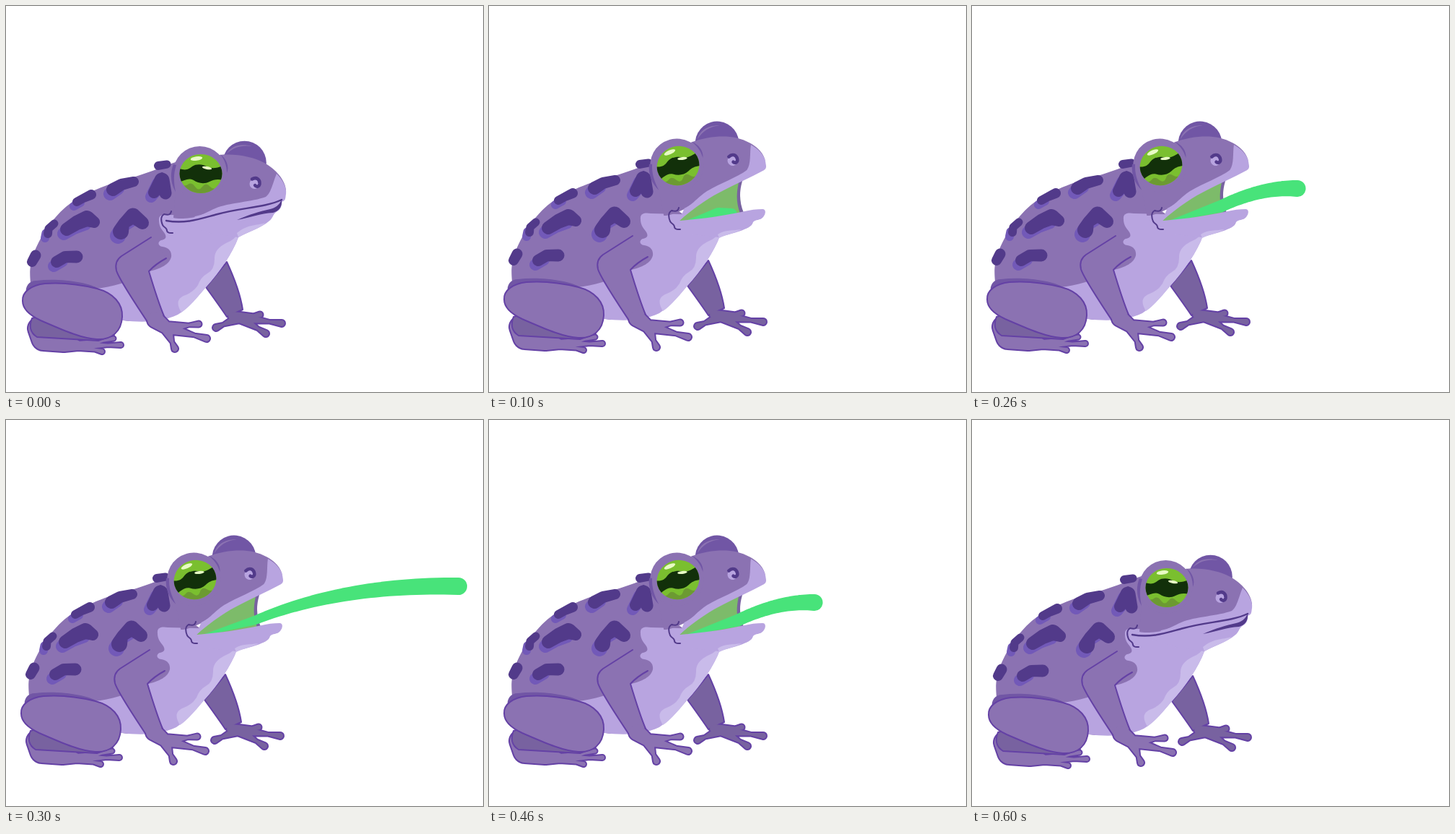
Recreate the animation shown at these times as an HTML page. Size 661x534 px, loop 0.7 s.

```html
<!DOCTYPE html>
<html lang="en">
<head>
<meta charset="utf-8">
<title>Frog</title>
<style>
html, body { margin: 0; width: 100%; height: 100%; overflow: hidden; background: #fff; }
svg { display: block; width: 661px; height: 534px; }
.skin { fill: #8b72b2; }
.light { fill: #b8a4e0; }
.pale { fill: #c9bbea; }
.shade { fill: #7862a0; }
.lid { fill: #7156a5; }
.spot { fill: #523a8a; }
.under { fill: #7259b8; }
.tongue { fill: #48e37a; }
.rim { fill: #6441a5; }
.edge { stroke: #6441a5; stroke-width: 2; stroke-linejoin: round; stroke-linecap: round; }
.line { fill: none; stroke: #523a8a; stroke-width: 2; stroke-linecap: round; }
</style>
</head>
<body>
<svg viewBox="0 0 661 534">
<defs>
  <clipPath id="ball"><ellipse cx="270" cy="232" rx="29.5" ry="27"/></clipPath>
</defs>

<g id="body">
  <g data-foot="shade" data-palm="314,429,8 324,431,9" data-tips="291,445,6 352,427,5.5 360,453,6 382,439,6">
    <path class="shade edge" d="M306 354Q324 393 328 420L306 430Q298 418 277 389Z"/>
  </g>
  <path class="skin" d="M238 215C217 222 190 234 165 240C135 248 106 261 88 274C65 291 46 321 38 344C32 361 33 370 34 384L70 420L170 436L225 428L285 370L300 310L262 284Z"/>
  <path class="light" d="M212 297C211 288 219 288 226 289L300 291L345 300L322 320C314 342 296 368 277 389C264 404 252 418 238 427C215 438 187 438 162 435L125 391C145 389 172 382 198 367C214 364 227 357 229 347C230 338 224 334 217 333C210 332 210 326 215 324C223 323 223 318 218 312C214 307 212 303 212 297Z"/>
  <path class="pale" d="M322 314Q317 323 307 327Q288 336 289 350Q289 365 279 370Q270 375 266 386Q260 396 246 401C236 406 237 414 243 424C256 415 266 402 277 389C296 368 314 342 322 320Z"/>

  <g id="spots"></g>

  <g data-foot="skin" data-palm="207,434,13 222,445,10" data-tips="234,474,6 278,460,6 267,440,5.5">
    <path class="skin" d="M201 320L156 350L198 367L222 349Z"/>
    <path class="skin edge" d="M201 320L160 346Q150 353 153 366Q156 377 196 437L219 429Q211 410 198 367Q207 357 222 349"/>
  </g>

  <g data-foot="skin" data-palm="45,446,16 52,460,18 80,465,15 100,470,8" data-tips="133,478,5 159,469,5 149,460,4.5"></g>
  <path class="shade edge" d="M36 432C32 442 33 452 43 458L128 463L150 455L60 425Z"/>
  <path class="lid" d="M28 398C26 388 32 380 42 380C76 376 116 383 128 391L80 388Z"/>
  <path class="skin edge" d="M23 408C22 395 36 386 54 384C80 382 106 386 126 391C149 397 162 412 161 430C160 450 147 462 126 461C104 460 76 447 48 435C33 428 23 420 23 408Z"/>
</g>

<g data-pose="closed">
  <path class="light" d="M230 298L382 269C383 275 381 281 376 284C369 288 371 293 364 298C353 307 339 311 322 320L285 315Z"/>
  <path class="pale" d="M360 300C346 304 335 302 320 314L322 320C338 311 350 309 360 300Z"/>
</g>

<g data-pose="open">
  <path fill="#7dbb6a" d="M264 297L300 262L347 241L349 287L300 297Z"/>
  <path class="shade" d="M346 244L352 239C346 257 347 272 353 286L348 287C342 271 343 258 346 244Z"/>
  <path id="tongue" class="tongue"/>
  <path class="light" d="M256 297H265C300 294 326 290 352 284.500C362 282 371 281 379 281C384 281 384 287 380 292C376 297 369 295 366 299C364 306 356 308 349 311C338 315 330 316 319 320L270 315Z"/>
  <path class="pale" d="M350 309C338 311 327 309 317 316L319 321C331 315 340 315 350 309Z"/>
</g>

<g id="head">
  <circle class="lid" cx="330.500" cy="217" r="30.300"/>
  <path class="skin" d="M306 204C313 192 327 190 341 194C327 192 316 195 306 204Z"/>
  <path class="skin" d="M238 216L296 206C320 204 343 209 358 217C374 226 389 242 388 258L366 267L290 283L262 292C250 294 240 295 232 293Z"/>
  <path class="light" d="M250 306L262 291C274 289 280 284 290 280C308 272 342 271 360 264C368 258 370 243 375 232C384 241 389 251 388 260C387 266 388 269 382 271C352 278 320 280 290 290C275 295 262 300 250 306Z"/>
  <circle class="skin" cx="268.500" cy="231" r="37"/>
  <path class="lid" d="M232 219C227 232 228 245 235 257C232 242 232 232 236 220Z"/>
  <path class="lid" d="M297 205C305 211 310 222 306 231C306 221 303 213 297 205Z"/>
  <g clip-path="url(#ball)">
    <path fill="#7abf2f" d="M238 202H302V262H238Z"/>
    <path fill="#6c9a32" d="M238 244Q247 251 252 247T262 250T272 250T283 250T302 246V264H238Z"/>
    <path fill="#12300a" d="M238 224C247 228 252 227 258 222C264 218 273 219 278 222C286 226 292 224 302 221V241C293 239 288 240 282 243C274 247 266 245 260 241C252 237 247 242 238 244Z"/>
    <ellipse cx="264" cy="211" rx="8.300" ry="2.900" fill="#e8fbc5" transform="rotate(-8 264 211)"/>
    <ellipse cx="278.500" cy="224" rx="6.800" ry="2" fill="#e8fbc5" transform="rotate(10 278.500 224)"/>
  </g>
  <circle class="light" cx="344.500" cy="246" r="7"/>
  <path class="line" stroke-linecap="round" style="stroke-width:4.500" d="M341 239.500C347 236 352 240 351.500 246C351 250 347 251 345 248"/>
</g>

<g data-pose="closed">
  <path class="line" style="stroke-width:2.400" d="M222 297C250 302 270 294 293 288C325 279 359 279 382 268"/>
  <path class="spot" d="M320 296C338 288 352 284 366 281C374 279 378 276 382 268C383 278 378 284 370 286C352 287 338 293 320 296Z"/>
</g>
<path id="curl" class="line" d="M229 284C228 290 223 289 219 288C214 291 215 298 217 303C219 307 223 306 223 311C224 315 228 314 231 314"/>
</svg>

<script>
const all = (selector) => document.querySelectorAll(selector);
const byId = (id) => document.getElementById(id);
const parse = (text) => text.split(" ").map((item) => item.split(",").map(Number));
const mix = (a, b, t) => a.map((v, i) => v + (b[i] - v) * t);

function makePath(cls, d) {
  const path = document.createElementNS("http://www.w3.org/2000/svg", "path");
  path.setAttribute("class", cls);
  path.setAttribute("d", d);
  return path;
}

// Two circles [x, y, r] joined by their outer tangents
function capsule([x0, y0, r0], [x1, y1, r1]) {
  const dir = Math.atan2(y1 - y0, x1 - x0);
  const gap = Math.hypot(x1 - x0, y1 - y0);
  const spread = Math.acos(Math.max(-1, Math.min(1, (r0 - r1) / gap)));
  const on = (x, y, r, a) => `${x + r * Math.cos(a)} ${y + r * Math.sin(a)}`;
  const wide = spread > Math.PI / 2;
  return `M${on(x0, y0, r0, dir + spread)}A${r0} ${r0} 0 ${+!wide} 1 ${on(x0, y0, r0, dir - spread)}` +
    `L${on(x1, y1, r1, dir - spread)}A${r1} ${r1} 0 ${+wide} 1 ${on(x1, y1, r1, dir + spread)}Z`;
}

const chain = (circles) => circles.slice(1).map((c, i) => capsule(circles[i], c)).join("");

// A palm with toes that narrow, then end in a round pad
all("[data-foot]").forEach((foot) => {
  const palm = parse(foot.dataset.palm);
  const root = palm[palm.length - 1];
  const toes = parse(foot.dataset.tips).map((tip) => {
    const [x, y] = mix(root, tip, 0.7);
    return [root, [x, y, 3.8], tip];
  });
  const outline = (inset) => [palm, ...toes]
    .map((part) => chain(part.map(([x, y, r]) => [x, y, r - inset]))).join("");
  foot.prepend(makePath("rim", outline(0)));
  foot.append(makePath(foot.dataset.foot, outline(2)));
});

// Lumpy spots: the lower end of each casts a shadow
const SPOTS = [
  "211,221,6 223,219,5.5",
  "148,254,9 160,247,8 177,243,7",
  "98,271,6 107,266,6 118,261,7",
  "84,309,9 98,300,10 112,294,11 122,299,8",
  "58,315,6 59,308,5.5 67,301,5.5",
  "205,258,8 216,241,10.5 221,259,8.5",
  "159,312,11 163,301,8 176,290,10.5 189,300,9",
  "36,354,7 41,345,7.5",
  "70,354,8 82,347,8 98,347,8.5"
];
SPOTS.map(parse).forEach((lumps) => {
  const shadow = lumps.slice(0, -1).map(([x, y, r]) => [x - 4, y + 6, r]);
  if (shadow.length > 1) byId("spots").append(makePath("under", chain(shadow)));
  byId("spots").append(makePath("spot", chain(lumps)));
});

// The tongue bends along a curve; its neck thins as it stretches
function tonguePath(reach) {
  const root = [276, 297, 1];
  if (reach < 2) return chain([root, [318, 287, 8], [336, 288, 8]]);
  const neck = [345, 277, 13 - 2.3 * reach];
  const [bend, tip] = reach === 2
    ? [[402, 250, 9], [451, 252.500, 11.5]]
    : [[467, 227, 10], [627, 230, 12]];
  const circles = [root];
  for (let t = 0; t <= 1; t += 1 / 32) {
    circles.push(mix(mix(neck, bend, t), mix(bend, tip, t), t));
  }
  return chain(circles);
}

const STEP = 100;
const FAR = 3;
const COUNT = 2 * FAR + 1;
let current = -1;

function setPose(reach) {
  const open = reach > 0;
  byId("body").setAttribute("transform", open ? "translate(-2 -2)" : "");
  byId("head").setAttribute("transform", open ? "translate(-8 -11) rotate(-16 270 232)" : "");
  byId("curl").setAttribute("transform", open ? "translate(34 -5)" : "");
  byId("tongue").setAttribute("d", tonguePath(reach));
  all("[data-pose]").forEach((el) => {
    el.style.display = (el.dataset.pose === "open") === open ? "" : "none";
  });
}

const start = performance.now();
function tick() {
  const step = Math.floor((performance.now() - start) / STEP) % COUNT;
  const reach = FAR - Math.abs(FAR - step); // out and back: 0 1 2 3 2 1 0
  if (reach !== current) setPose(current = reach);
  requestAnimationFrame(tick);
}
tick();
</script>
</body>
</html>
```
